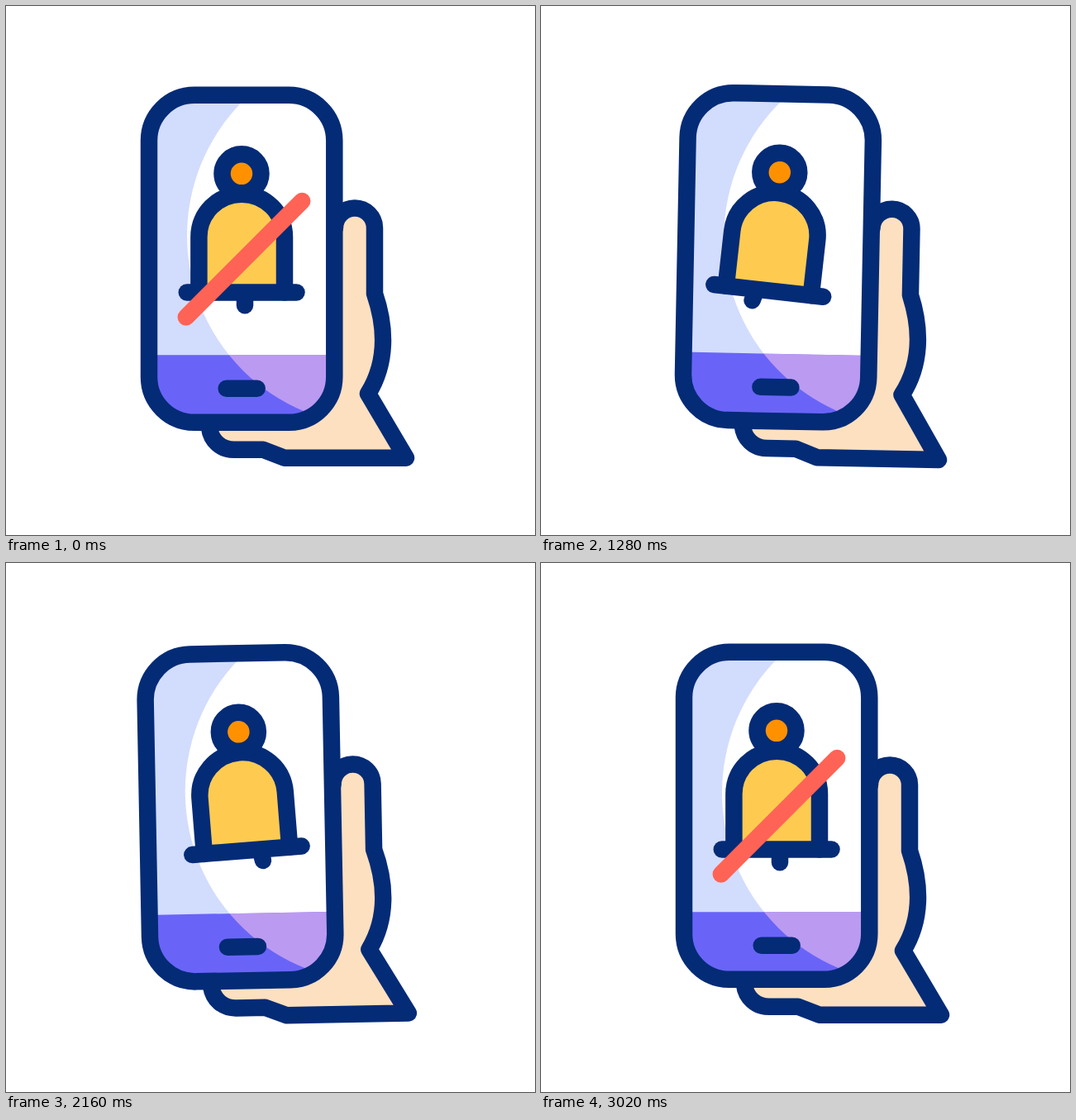
Recreate the animation shown at these times as an HTML page. Size 640 by 640 pixels, loop 3220 ms.

```html
<!DOCTYPE html>
<html lang="en">
<head>
<meta charset="utf-8">
<title>Muted phone</title>
<style>
  html, body { margin: 0; height: 100%; overflow: hidden; background: #fff; }
  svg { display: block; width: 100vw; height: 100vh; }
  .line { stroke: #042b76; stroke-width: 20.5; stroke-linecap: round; stroke-linejoin: round; fill: none; }
</style>
</head>
<body>
<svg viewBox="0 0 640 640">
  <defs>
    <rect id="case" x="173" y="107.8" width="224.3" height="396" rx="55"/>
    <clipPath id="screen"><use href="#case"/></clipPath>
    <clipPath id="glare"><circle cx="449" cy="278" r="230"/></clipPath>
  </defs>
  <g id="phone">
    <path class="line" style="fill:#fde0bf" d="M398 268.5A24 24 0 0 1 446 268.5V348C460 389 461 432 438 469L484 546.8H337L311 536.8H276C260 536.8 248 526 246 510"/>
    <g clip-path="url(#screen)">
      <path fill="#d2dcfd" d="M163 98H408V514H163Z"/>
      <path fill="#6964f7" d="M163 422.3H408V514H163Z"/>
      <g clip-path="url(#glare)">
        <path fill="#fff" d="M163 98H408V422.3H163Z"/>
        <path fill="#bb9af1" d="M163 422.3H408V514H163Z"/>
      </g>
    </g>
    <use href="#case" class="line"/>
    <path class="line" d="M266.7 462.8H303.7"/>
    <g id="bell">
      <path id="clapper" class="line" d="M289 347V362.3"/>
      <path class="line" style="fill:#fecb50" d="M233.4 346.6V279.5A51.8 51.8 0 0 1 337 279.5V346.6"/>
      <path class="line" d="M218.8 346.6H351.5"/>
    </g>
    <circle class="line" style="fill:#ff9100" cx="285" cy="202.8" r="23.5"/>
    <path id="slash" fill="none" stroke="#ff6355" stroke-width="20.5" stroke-linecap="round"/>
  </g>
</svg>
<script>
const LOOP = 3220;
const $ = id => document.getElementById(id);
const smooth = u => u * u * (3 - 2 * u);
const easeOut = u => 1 - (1 - u) ** 3.6;

// Turning points of each swing: time in ms, degrees counter-clockwise, easing.
const phoneSwing = [[205, 0], [900, 12, easeOut], [1710, -16.8], [1967, 7.6], [2310, -3.3], [2580, 0]];
const bellSwing = [[900, 0], [1528, -8], [2011, 8], [2440, -8], [3020, 0]];

function progress(t, from, to) {
  return Math.min(1, Math.max(0, (t - from) / (to - from)));
}

// Adds up the eased steps from one turning point to the next.
function angle(swing, t) {
  let sum = 0;
  for (let i = 1; i < swing.length; i++) {
    const [from, a] = swing[i - 1], [to, b, ease = smooth] = swing[i];
    sum += (b - a) * ease(progress(t, from, to));
  }
  return sum;
}

function turn(id, degrees, x, y) {
  $(id).setAttribute('transform', `rotate(${-degrees} ${x} ${y})`);
}

function draw(t) {
  const ring = angle(bellSwing, t);
  turn('phone', angle(phoneSwing, t), 364.7, 395.6);
  turn('bell', ring, 285, 228);
  turn('clapper', 2.8 * ring, 285, 276);

  const reach = 140.4 * (t < 220 ? 1 : smooth(progress(t, 2350, 2800)));
  $('slash').setAttribute('d', reach ? `M358.2 236l${-reach} ${reach}` : '');
}

const start = performance.now();
function tick() {
  draw((performance.now() - start) % LOOP);
  requestAnimationFrame(tick);
}
tick();
</script>
</body>
</html>
```
